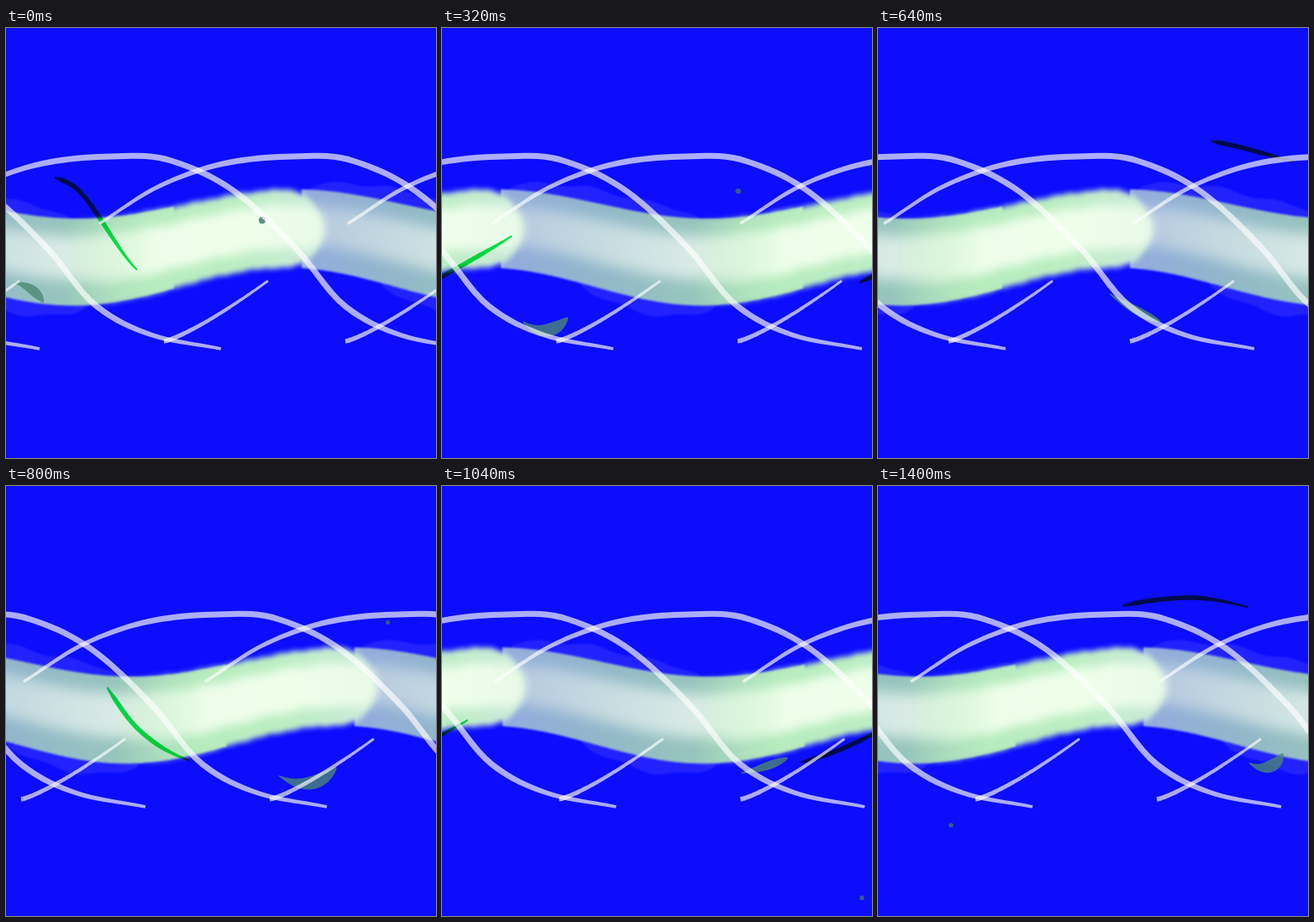
Write an HTML page with a canvas that moves like this. It is 512 px wide and 512 px high and loops after 1.44 s.

```html
<!DOCTYPE html>
<html>
<head>
<meta charset="utf-8">
<style>
html, body { margin: 0; height: 100%; overflow: hidden; background: #0c0cff; }
canvas { display: block; }
</style>
</head>
<body>
<canvas id="stage" width="512" height="512"></canvas>
<script>
const SIZE = 512, LOOP = 1440;
const ctx = document.getElementById('stage').getContext('2d');
const wrap = (v, n) => ((v % n) + n) % n;
const mix = (a, b, u) => a + (b - a) * u;
const clamp = v => Math.min(1, Math.max(0, v));

// Smooth y(x) through points; repeats when a period is given.
function curve(points, period) {
  const p = period
    ? [-1, 0, 1].flatMap(k => points.map(([x, y]) => [x + k * period, y]))
    : points;
  const slope = p.map((_, i) => {
    const a = p[Math.max(0, i - 1)], b = p[Math.min(p.length - 1, i + 1)];
    return (b[1] - a[1]) / (b[0] - a[0]);
  });
  return x => {
    if (period) x = wrap(x, period);
    let i = 0;
    while (i < p.length - 2 && x > p[i + 1][0]) i++;
    const [xa, ya] = p[i], [xb, yb] = p[i + 1], h = xb - xa;
    const u = (x - xa) / h, v = 1 - u;
    return ya * (1 + 2 * u) * v * v + yb * u * u * (3 - 2 * u)
      + h * u * v * (slope[i] * v - slope[i + 1] * u);
  };
}

// Rows are [time, ...values]; values are interpolated linearly.
function keyed(rows, t) {
  let i = 0;
  while (i < rows.length - 2 && t >= rows[i + 1][0]) i++;
  const a = rows[i], b = rows[i + 1];
  return a.slice(1).map((v, j) => mix(v, b[j + 1], (t - a[0]) / (b[0] - a[0])));
}

function fillPolygon(g, points) {
  g.beginPath();
  points.forEach(([x, y]) => g.lineTo(x, y));
  g.fill();
}

// Brush mark along at(u), u = 0..1, with a varying width.
function ribbon(at, width, steps = 80) {
  const left = [], right = [];
  for (let i = 0; i <= steps; i++) {
    const u = i / steps, [x, y] = at(u);
    const [xa, ya] = at(Math.max(0, u - .005)), [xb, yb] = at(Math.min(1, u + .005));
    const k = width(u) / 2 / Math.hypot(xb - xa, yb - ya);
    left.push([x - (yb - ya) * k, y + (xb - xa) * k]);
    right.unshift([x + (yb - ya) * k, y - (xb - xa) * k]);
  }
  fillPolygon(ctx, left.concat(right));
}

const wave = (mid, amp, crest) => x =>
  mid - amp * Math.cos(2 * Math.PI * (x - crest) / SIZE);
const bandTop = wave(209.5, 17.5, 343);
const bandBottom = wave(308, 22.5, 335);
const across = f => x => mix(bandTop(x), bandBottom(x), f);

const tile = document.createElement('canvas');
tile.width = tile.height = SIZE;
const paint = tile.getContext('2d');

// Part of the band between two edges; colors run evenly from x0 to x1.
function slab(x0, x1, top, bottom, colors, blur, cap = 0, rough = 0) {
  const fill = paint.createLinearGradient(x0, 0, x1, 0);
  colors.forEach((color, i) => fill.addColorStop(i / (colors.length - 1), color));
  const upper = [], lower = [];
  for (let x = x0; x <= x1; x += 2) {
    const e = cap && Math.max(0, (x - x1 + cap) / cap);
    const squeeze = (1 - Math.sqrt(1 - e * e)) / 2;
    const n = rough * (Math.sin(x * .33) + Math.sin(x * .13 + 1));
    upper.push([x, mix(top(x), bottom(x), squeeze) + n]);
    lower.unshift([x, mix(bottom(x), top(x), squeeze) - n]);
  }
  paint.filter = `blur(${blur}px)`;
  paint.fillStyle = fill;
  fillPolygon(paint, upper.concat(lower));
}

function paintBand() {
  const halo = (x, a, b) => (16 + 2.5 * Math.sin(x * .09))
    * Math.sqrt(Math.sin(Math.PI * clamp((x - a) / (b - a))));
  for (const shift of [0, SIZE]) {
    paint.setTransform(1, 0, 0, 1, shift, 0);
    slab(-150, 100, x => bandTop(x) - halo(x, -150, 75),
      x => bandBottom(x) + halo(x, -65, 95), ['#ffffff18', '#ffffff18'], 1);
    slab(-160, 200, bandTop, bandBottom,
      ['#93abdf', '#92b8c9', '#98c7bc', '#b0dfbd'], 1);
    slab(-170, 200, across(.2), across(.7),
      ['#b2c4df', '#c5dae0', '#dbece5', '#e8f8e8'], 8);
  }
  paint.setTransform(1, 0, 0, 1, 0, 0);
  slab(70, 376, bandTop, bandBottom,
    ['#b7ecbe00', '#b7ecbe', '#bbeec2', '#cdeadb'], 3, 44, .5);
  slab(76, 380, across(.2), across(.76),
    ['#edfde900', '#edfde9', '#eefee9', '#e8fae8'], 6, 30, 1);
}

const strand = curve([[0, 233], [70, 189], [150, 161], [245, 152.5], [300, 157.5],
  [375, 193], [450, 262], [505, 328], [570, 364], [657, 382]]);
const riser = x => 373 - 72 * ((x + 219) / 124) ** 1.25;
const flight = curve([[58, 178], [90, 197], [156, 288], [225, 329], [330, 343],
  [455, 321], [570, 263], [719, 170], [877, 133], [1012, 160]], 1024);

// [time, distance]
const scroll = [[0, 0], [960, 690], [1200, 851], [1400, 988]];
// [time, middle of the streak on its flight curve]
const streak = [[0, 107], [320, 546], [640, 958], [960, 1429], [1200, 1669], [1400, 1902]];
// [time, x, y, tilt, bend]
const leaf = [[0, 27, 315, .59, -5], [320, 123, 347, -.09, 13], [640, 306, 333, .5, 2],
  [800, 359, 340, -.14, 14], [960, 375, 339, -.59, 8], [1200, 402, 320, .23, -11],
  [1400, 462, 324, -.27, 11]];

// Repeat a drawing at every stage width so that it wraps around.
function tiled(x, from, to, draw) {
  for (let k = from; k <= to; k++) {
    ctx.save();
    ctx.translate(wrap(x, SIZE) + k * SIZE, 0);
    draw();
    ctx.restore();
  }
}

function along(path, a, b, width) {
  ribbon(u => [mix(a, b, u), path(mix(a, b, u))], width);
}

function drawStrands(distance) {
  ctx.fillStyle = 'rgba(255,255,255,.66)';
  for (const offset of [0, 216])
    tiled(407 + 2 * distance + offset, -2, 1, () => {
      along(strand, 0, 657, u => 3.5 + 3.5 * clamp(u * 4) - 3.5 * clamp(u * 5 - 4));
      along(riser, -219, -95, u => 5.5 - 2.5 * u);
    });
}

function drawStreak(t) {
  const [middle] = keyed(streak, t);
  const half = mix(49, 75, clamp((t - 960) / 240));
  ctx.globalCompositeOperation = 'multiply';
  ctx.fillStyle = '#00e64b';
  tiled(middle, -1, 1, () => along(x => flight(middle + x), -half, half,
    u => 2 + 3.5 * Math.min(1, u * 10, (1 - u) * 2.5)));
  ctx.globalCompositeOperation = 'source-over';
}

function drawLeaf(t) {
  const [x, y, tilt, bend] = keyed(leaf, t);
  const half = 21 + 14 * Math.sin(Math.PI * t / LOOP) ** 2;
  ctx.fillStyle = 'rgba(76,136,113,.78)';
  tiled(x, -1, 0, () => {
    ctx.translate(0, y);
    ctx.rotate(tilt);
    along(d => bend * (1 - (d / half) ** 2), -half, half,
      u => 1 + (8 + Math.abs(bend) / 2) * Math.sin(Math.PI * u ** 1.4) ** .75);
  });
}

// Drifts up to the right while fading out and back, then re-enters from below.
function drawSpeck(t) {
  const p = t / 960, below = t >= 1040;
  const x = below ? 32 + .275 * (t - 1200) : 305 + 188 * p ** 1.25;
  const y = below ? 452 - .24 * (t - 1200) : 159 + 70 * Math.max(0, 1 - p) ** 1.7;
  const r = below ? 2.8 : 4 * Math.abs(1 - t / 640) ** .3;
  ctx.fillStyle = 'rgba(60,110,105,.8)';
  tiled(x, 0, 0, () => {
    ctx.beginPath();
    ctx.arc(0, y, r, 0, 7);
    ctx.fill();
  });
}

function draw(t) {
  const [distance] = keyed(scroll, t);
  ctx.fillStyle = '#0c0cff';
  ctx.fillRect(0, 0, SIZE, SIZE);
  tiled(Math.round(distance), -1, 0, () => ctx.drawImage(tile, 0, 0));
  drawStreak(t);
  drawLeaf(t);
  drawSpeck(t);
  drawStrands(distance);
}

function tick() {
  const t = performance.now() % LOOP;
  draw(t < 1400 ? Math.floor(t / 80) * 80 : 1400);
  requestAnimationFrame(tick);
}

paintBand();
tick();
</script>
</body>
</html>
```
